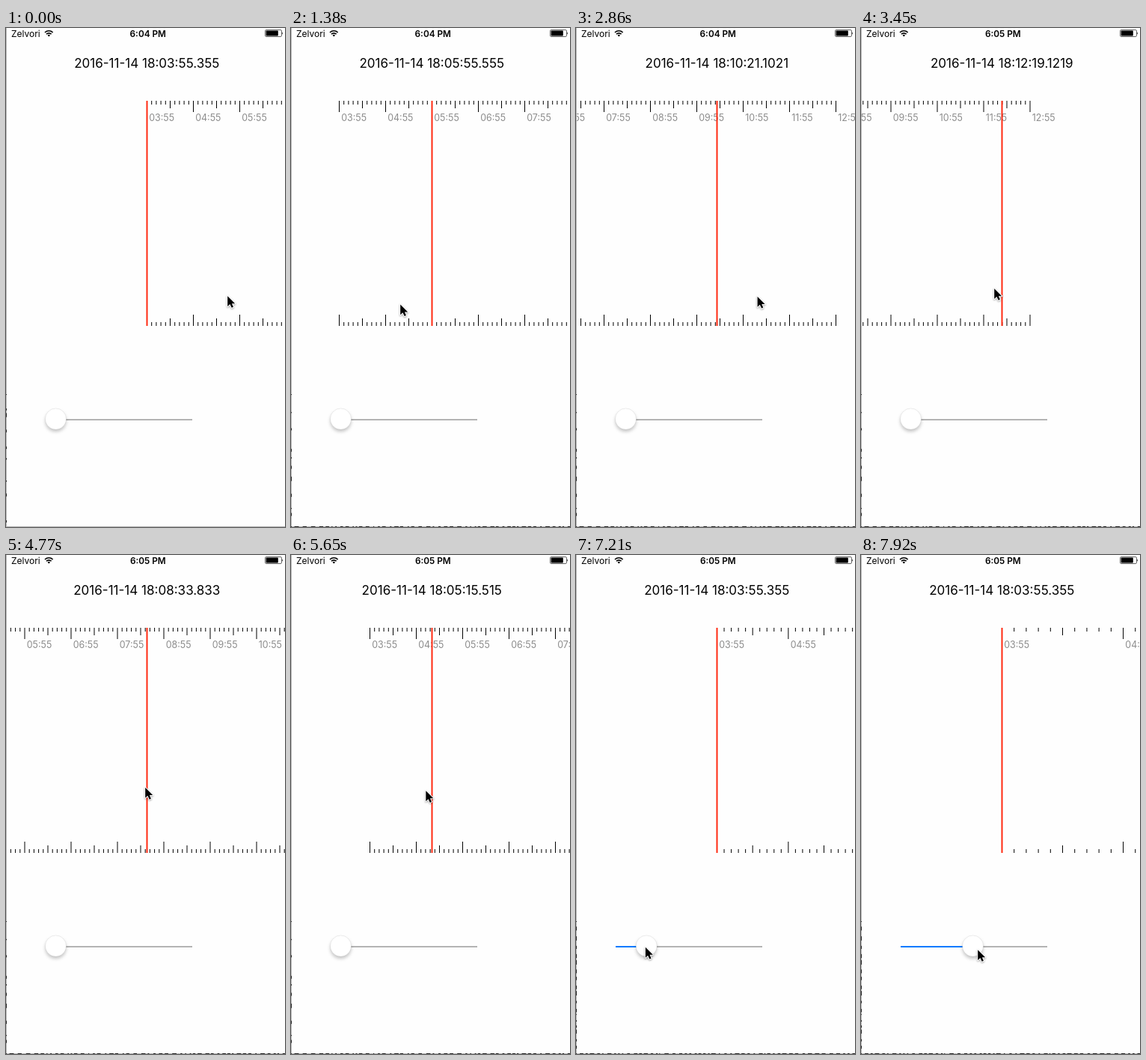
An HTML page for the animation above (8 s loop, 373 px wide and 665 px high).

```html
<!DOCTYPE html>
<html lang="en">
<head>
<meta charset="utf-8">
<title>Time ruler</title>
<style>
  html, body { margin: 0; width: 100%; height: 100%; overflow: hidden; background: #fefefe; }
  svg { display: block; width: 100%; height: 100%; font-family: Inter, "Liberation Sans", sans-serif; }
  .status { font-size: 12px; }
  #clock { font-weight: 600; font-size: 11.8px; text-anchor: middle; }
  #date { font-size: 17.05px; text-anchor: middle; }
  #labels { font-size: 12.4px; fill: #8c8c8c; }
  #ticks { fill: none; stroke: #000; }
  #thumb { fill: #fff; stroke: rgba(0, 0, 0, .13); stroke-width: .6; filter: drop-shadow(0 3px 2px rgba(0, 0, 0, .22)); }
  #pointer { fill: #000; stroke: #fff; stroke-width: 2; stroke-linejoin: round; paint-order: stroke; filter: drop-shadow(0 1px 1px rgba(0, 0, 0, .35)); }
  .edge { stroke: #b8b8b8; }
  .specks { stroke: #222; }
</style>
</head>
<body>
<svg viewBox="0 0 373 665">
  <rect width="373" height="665" fill="#fefefe"/>
  <clipPath id="screen"><rect x="1" width="372" height="664"/></clipPath>

  <path class="edge" d="M.5 0V665M0 664.5H373"/>
  <path class="specks" id="leftSpecks"/>
  <path class="specks" id="bottomSpecks"/>

  <text class="status" x="7" y="11.5">Zelvori</text>
  <g fill="none" stroke="#000" stroke-width="1.7">
    <path d="M52 6A7.4 7.4 0 0 1 62.6 6M54 8.2A4.6 4.6 0 0 1 60.6 8.2"/>
    <path d="M55.6 9.8A2.3 2.3 0 0 1 59 9.8L57.3 11.6Z" fill="#000" stroke="none"/>
  </g>
  <text id="clock" x="189.8" y="11.5"></text>
  <rect x="346.5" y="2.5" width="22" height="9" rx="1.6" fill="none" stroke="#000" stroke-width=".6"/>
  <rect x="347.6" y="3.6" width="16.2" height="6.8" rx=".7"/>
  <path d="M369.2 5.5Q371 7 369.2 8.7Z"/>

  <text id="date" x="188.3" y="53"></text>

  <g clip-path="url(#screen)">
    <path id="ticks"/>
    <g id="labels"></g>
  </g>
  <rect x="187.5" y="97" width="2" height="300" fill="#ff2a12"/>

  <path d="M53 522H249" stroke="#b4b4b4" stroke-width="2"/>
  <path id="fill" stroke="#007aff" stroke-width="2"/>
  <circle id="thumb" cy="521" r="14"/>
  <path id="pointer" d="M-.8 -.8V13L2.4 10L4.7 14.8L6.9 13.8L4.9 9.2H9.2Z"/>
</svg>
<script>
const LOOP = 8000, STEP = 60;
const ORIGIN = 188.5, MINUTES = 9, MINUTE_WIDTH = 62;
const START = 18 * 3600 + 3 * 60 + 55;
const THUMB_START = 66.5, THUMB_GAIN = 0.874, ZOOM = 1.205;

const $ = id => document.getElementById(id);
const pad = n => String(n).padStart(2, "0");

// The hand's path, timed in steps; dragging scrolls the ruler, sliding moves the thumb.
const poses = [{ step: 0, x: 297, y: 358, scroll: 0, slid: 0 }];
const last = () => poses[poses.length - 1];
const rest = step => poses.push({ ...last(), step });
const move = (step, x, y) => poses.push({ ...last(), step, x, y });
const drag = (step, x, y) => poses.push({ ...last(), step, x, y, scroll: Math.max(0, last().scroll + last().x - x) });
const slide = (step, x, y) => poses.push({ ...last(), step, x, y, slid: last().slid + x - last().x });

rest(8);
move(12, 271, 366);
rest(15);
drag(25, 116, 370);
rest(29);
move(34, 258.5, 372);
drag(43, 14.6, 370);
move(48, 300.6, 356);
drag(56, 168, 349);
drag(63, 245, 342);
rest(70);
move(74, 20, 318);
drag(81, 253.8, 308);
rest(85);
move(89, 43, 312);
drag(97, 264, 317);
rest(100);
move(108, 100, 516);
move(113, 62, 522);
rest(114);
slide(132, 157, 527);

function poseAt(step) {
  const next = poses.findIndex(pose => pose.step > step);
  if (next < 0) return last();
  const a = poses[next - 1], b = poses[next];
  const p = (step - a.step) / (b.step - a.step);
  const mix = key => a[key] + (b[key] - a[key]) * p;
  return { x: mix("x"), y: mix("y"), scroll: mix("scroll"), slid: mix("slid") };
}

function randomFrom(seed) {
  return () => (seed = (seed * 16807) % 2147483647) / 2147483647;
}

// Dashes of the window behind, showing along an edge.
function specks(command, start, from, to, gap, seed) {
  const random = randomFrom(seed);
  let d = start;
  for (let at = from; at < to; at += 2 + random() * gap * 2) {
    const length = 1 + random() * 5;
    d += (command === "h" ? `M${at} 664.5h` : `M.5 ${at}v`) + length;
    at += length;
  }
  return d;
}

const labels = Array.from({ length: MINUTES + 1 }, (_, i) => {
  const label = document.createElementNS("http://www.w3.org/2000/svg", "text");
  label.textContent = pad(i + 3) + ":55";
  label.setAttribute("y", 123.7);
  return $("labels").appendChild(label);
});

function dateText(scroll) {
  const total = START + Math.round(scroll / MINUTE_WIDTH * 60);
  const h = Math.floor(total / 3600), m = Math.floor(total / 60) % 60, s = pad(total % 60);
  return `2016-11-14 ${pad(h)}:${pad(m)}:${s}.${m}${s}`;
}

function drawRuler(scroll, minute) {
  const left = ORIGIN - scroll;
  let d = "";
  for (let i = 0; i <= MINUTES * 10; i++) {
    const x = (left + i * minute / 10).toFixed(2);
    const length = i % 10 === 0 ? 15 : i % 5 === 0 ? 10 : 5;
    d += `M${x} 97v${length}M${x} 397v${-length}`;
  }
  $("ticks").setAttribute("d", d);
  labels.forEach((label, i) => label.setAttribute("x", left + i * minute + 2.8));
}

function draw(step) {
  const { x, y, scroll, slid } = poseAt(step);
  const snapped = Math.round(scroll * 2) / 2;
  const moved = slid * THUMB_GAIN, thumb = THUMB_START + moved;
  const scene = step < 9 ? 0 : step < 115 ? 1 : 2;

  $("clock").textContent = step < 50 ? "6:04 PM" : "6:05 PM";
  $("date").textContent = dateText(snapped);
  drawRuler(snapped, MINUTE_WIDTH + moved * ZOOM);
  $("thumb").setAttribute("cx", thumb);
  $("fill").setAttribute("d", `M53 522H${thumb}`);
  $("pointer").setAttribute("transform", `translate(${x} ${y})`);
  $("leftSpecks").setAttribute("d", specks("v", "", 488, 660, scene < 2 ? 18 : 3, 11 + scene));
  $("bottomSpecks").setAttribute("d", scene ? specks("h", "", 0, 373, 2, 40 + scene) : "");
}

function tick() {
  draw(Math.floor(performance.now() % LOOP / STEP));
  requestAnimationFrame(tick);
}
tick();
</script>
</body>
</html>
```
